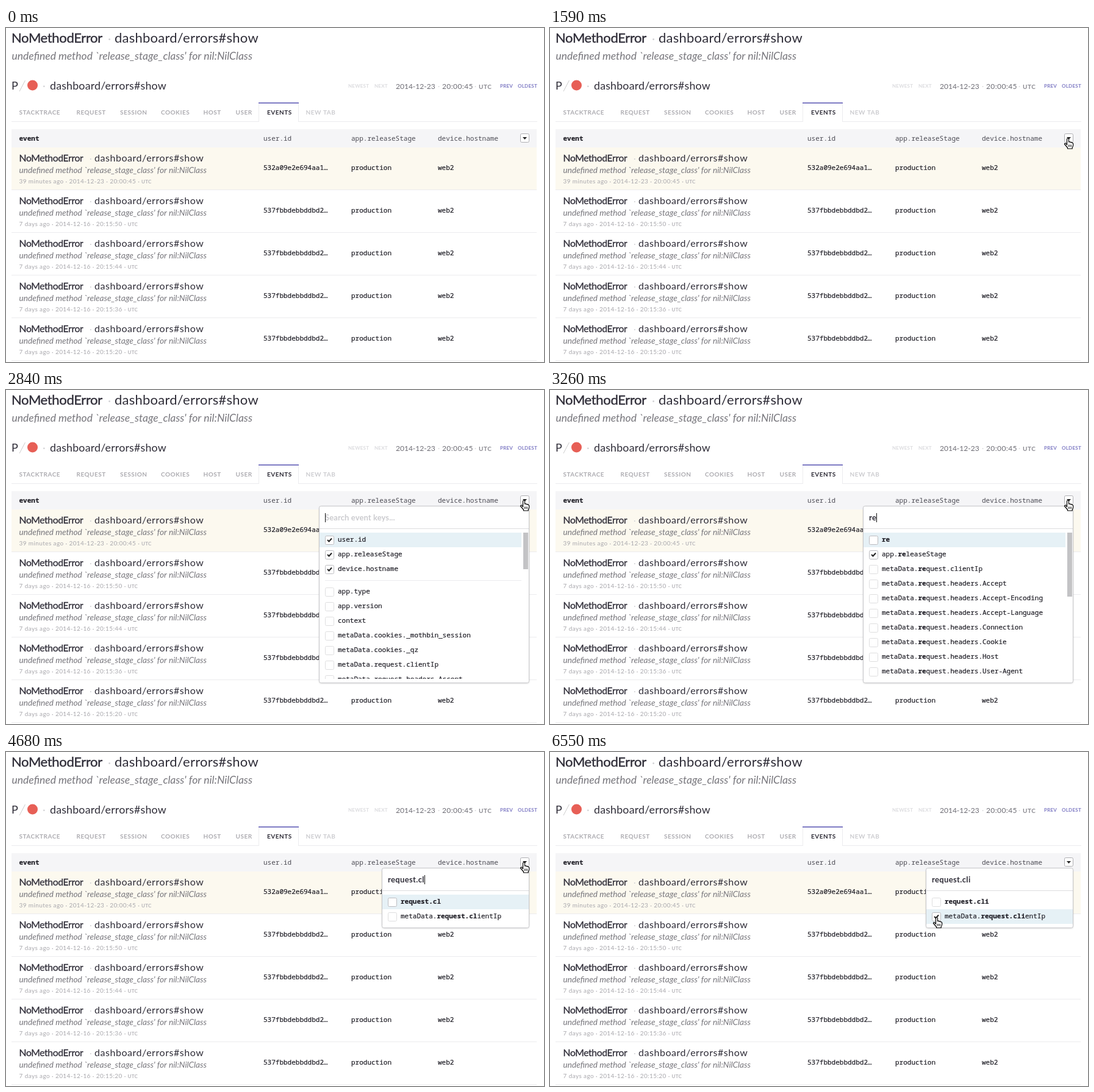
An HTML page with a canvas that plays this animation: 882x548 px, repeating every 8 s.

```html
<!DOCTYPE html>
<html lang="en">
<head>
<meta charset="utf-8">
<title>Event key picker</title>
<style>
html, body { margin: 0; width: 100%; height: 100%; overflow: hidden; background: #fff; }
canvas { display: block; }
</style>
</head>
<body>
<canvas id="stage" width="882" height="548"></canvas>
<script>
const ctx = document.getElementById('stage').getContext('2d');
const LOOP = 8000;
const INK = '#2f2d38', PURPLE = '#7f7bc4', RULE = '#ececee', DOT = '#d2d2d5';
const sans = (size, style = '') => `${style} ${size}px Lato, sans-serif`;
const mono = (style = '') => `${style} 11px "Noto Sans Mono", monospace`;

const KEYS = [
  'user.id', 'app.releaseStage', 'device.hostname', 'app.type', 'app.version', 'context',
  'metaData.cookies._mothbin_session', 'metaData.cookies._qz', 'metaData.request.clientIp',
  ...['Accept', 'Accept-Encoding', 'Accept-Language', 'Connection', 'Cookie', 'Host',
    'User-Agent', 'X-Forwarded-For'].map(name => 'metaData.request.headers.' + name)
];
const CHECKED = KEYS.slice(0, 3);
const CLIENT_IP = 'metaData.request.clientIp';

// Each timeline lists [start in ms, value]; a value holds until the next one.
const QUERY = [[1830, ''], [2900, 'r'], [3260, 're'], [3640, 'req'], [3820, 'requ'], [3910, 'reque'],
  [4000, 'reques'], [4170, 'request'], [4500, 'request.'], [4680, 'request.cl'], [4770, 'request.cli']];
const THUMB = [[0, 60], [2900, 97], [3260, 105], [3640, 114]];
const CARET = [[0, true], [2370, false], [2840, true], [5310, false], [5840, true], [6400, false]];
const POINTER = [[1080, [862, 181]], [1185, [853, 181]], [1290, [846, 181]], [1530, [847, 181]],
  [1590, [849, 180.5]], [5580, [845, 187]], [5670, [826, 206]], [5760, [780, 234]], [5820, [736, 251]],
  [5880, [704, 259.5]], [5960, [676, 266]], [6050, [655, 270]], [6140, [643, 272]], [6310, [634, 273]],
  [6400, [634, 271]]];

function at(timeline, t) {
  let value;
  for (const [start, v] of timeline) if (t >= start) value = v;
  return value;
}

function text(str, x, y, font, color = INK, spacing = 0, weight = 0) {
  ctx.font = font;
  ctx.letterSpacing = spacing + 'px';
  ctx.fillStyle = ctx.strokeStyle = color;
  ctx.fillText(str, x, y);
  if (weight) {
    ctx.lineWidth = weight;
    ctx.strokeText(str, x, y);
  }
  return x + ctx.measureText(str).width;
}

const code = (str, x, y, style) => text(str, x, y, mono(style), '#1f1e26', 0, .2);

function rect(x, y, w, h, color) {
  ctx.fillStyle = color;
  ctx.fillRect(x, y, w, h);
}

function box(x, y, w, h, radius, border) {
  ctx.beginPath();
  ctx.roundRect(x + .5, y + .5, w - 1, h - 1, radius);
  ctx.fillStyle = '#fff';
  ctx.fill();
  ctx.shadowColor = 'transparent';
  ctx.lineWidth = 1;
  ctx.strokeStyle = border;
  ctx.stroke();
}

function line(points, color, width) {
  ctx.beginPath();
  points.forEach(p => ctx.lineTo(...p));
  ctx.strokeStyle = color;
  ctx.lineWidth = width;
  ctx.stroke();
}

function drawHeader() {
  text('NoMethodError', 9, 24, sans(22), INK, -.35, .4);
  text('·', 167, 24, sans(20), DOT);
  text('dashboard/errors#show', 178, 24, sans(22), INK, .24);
  text("undefined method `release_stage_class' for nil:NilClass", 9.5, 52, sans(17.53, 'italic'), '#77767c');

  text('P', 9, 101, sans(18));
  line([[22, 104], [31.5, 86]], '#ccc', 1);
  ctx.beginPath();
  ctx.arc(43.5, 94, 8.5, 0, 2 * Math.PI);
  ctx.fillStyle = '#e75f56';
  ctx.fill();
  text('·', 60, 101, sans(18), DOT);
  text('dashboard/errors#show', 72, 101, sans(17.8), INK, .2);

  const link = sans(8, 'bold'), date = sans(12);
  text('NEWEST', 561, 98, link, '#dcdcdf', .2);
  text('NEXT', 604, 98, link, '#dcdcdf', .2);
  text('2014-12-23', 639, 100, date, '#6d6c74');
  text('·', 708, 100, date, DOT);
  text('20:00:45', 715, 100, date, '#6d6c74', .4);
  text('·', 768, 100, date, DOT);
  text('UTC', 775, 100, sans(10, 'bold'), '#8a8990', .5);
  text('PREV', 810, 98, link, PURPLE, .2);
  text('OLDEST', 839, 98, link, PURPLE, .25);
}

function drawTabs() {
  rect(9, 153, 862, 1, RULE);
  rect(414, 122, 66, 32, RULE);
  rect(415, 122, 64, 32, '#fff');
  rect(414, 122, 66, 2, PURPLE);
  const tabs = [['STACKTRACE', 21.5], ['REQUEST', 115.5], ['SESSION', 187], ['COOKIES', 254], ['HOST', 323.5],
    ['USER', 376.5], ['EVENTS', 428, INK], ['NEW TAB', 491.5, '#ccccd0']];
  for (const [label, x, color = '#adacb1'] of tabs) text(label, x, 142, sans(10, 'bold'), color, .5);
}

function drawRow(i, age, stamp, userId) {
  const y = 196 + 70 * i;
  if (i === 0) rect(9, y, 861, 69, '#fcf9ef');
  rect(9, y + 69, 861, 1, RULE);
  text('NoMethodError', 21.5, y + 23, sans(15.7), INK, -.35, .3);
  text('·', 137, y + 23, sans(14), DOT);
  text('dashboard/errors#show', 145, y + 23, sans(16), INK, .54);
  text("undefined method `release_stage_class' for nil:NilClass", 21.5, y + 42, sans(13.67, 'italic'), '#77767c');
  const end = text(`${age} ago · ${stamp} · `, 21.5, y + 59, sans(10), '#a9a8ad', .4);
  text('UTC', end, y + 59, sans(8, 'bold'), '#b4b3b8', .2);
  code(userId, 422, y + 37);
  code('production', 566, y + 37);
  code('web2', 708, y + 37);
}

function drawTable() {
  rect(9, 166, 861, 30, '#f5f5f7');
  code('event', 21.5, 185, 'bold');
  CHECKED.forEach((key, i) => text(key, [422, 566, 708][i], 185, mono(), '#4c4b54'));
  box(843, 173, 15, 15, 2, '#aeaeb2');
  ctx.beginPath();
  [[847, 179], [854, 179], [850.5, 183]].forEach(p => ctx.lineTo(...p));
  ctx.fillStyle = '#222';
  ctx.fill();

  drawRow(0, '39 minutes', '2014-12-23 · 20:00:45', '532a09e2e694aa1…');
  ['15:50', '15:44', '15:36', '15:20'].forEach((time, i) =>
    drawRow(i + 1, '7 days', '2014-12-16 · 20:' + time, '537fbbdebbddbd2…'));
}

function drawOption(key, query, left, y, right, active, checked) {
  if (active) rect(left + 1, y, right - left - 1, 24, '#e6f1f6');
  box(left + 10, y + 5, 15, 15, 2, active || checked ? '#bcbcc0' : '#dededf');
  if (checked) line([[left + 14, y + 12], [left + 16.5, y + 14.5], [left + 21, y + 9.5]], '#222', 2);
  const start = query ? key.indexOf(query) : 0, end = start + query.length;
  let x = code(key.slice(0, start), left + 31, y + 15);
  x = code(key.slice(start, end), x, y + 15, 'bold');
  code(key.slice(end), x, y + 15);
}

function drawPicker(t, query) {
  const options = query ? [query, ...KEYS.filter(key => key.includes(query))] : KEYS;
  const small = options.length < 3;
  const left = small ? 616 : 513, height = small ? 99 : 291;
  ctx.save();
  ctx.shadowColor = 'rgba(0,0,0,.16)';
  ctx.shadowBlur = 3;
  ctx.shadowOffsetY = 1;
  box(left, 190, 858 - left, height, 3, '#c6c6c9');
  ctx.restore();
  rect(left + 1, 227, 856 - left, 1, '#dcdcdf');

  const inputFont = sans(13, 'bold');
  const caretX = text(query, left + 10, 214, inputFont, INK, .35);
  if (!query) text('Search event keys...', left + 10, 214, inputFont, '#cbcbcf', .1);
  if (at(CARET, t)) rect(Math.round(caretX), 202, 1, 15, '#111');

  ctx.save();
  ctx.beginPath();
  ctx.rect(left, 229, 858 - left, small ? 58 : 245);
  ctx.clip();
  const active = t >= 5960 ? 1 : 0;
  options.forEach((key, i) => {
    const gap = !query && i >= CHECKED.length ? 13 : 0;
    const checked = CHECKED.includes(key) || key === CLIENT_IP && t >= 6550;
    drawOption(key, query, left, 234 + 24 * i + gap, small ? 857 : 845, i === active, checked);
  });
  if (!query) rect(left + 10, 312, 322, 1, RULE);
  if (!small) rect(848, 234, 8, at(THUMB, t), '#c3c3c5');
  ctx.restore();
}

function drawHand(x, y) {
  ctx.save();
  ctx.translate(x, y);
  ctx.lineJoin = 'round';
  const outline = new Path2D(`M-1.5 11V2Q-1.5.5 0 .5T1.5 2V6.5Q3.5 5.5 4.2 7.2Q6 6.2 6.8 8
    Q8.5 7.5 8.6 9.5V12Q8.4 14 7.2 15.5V17.5H-.5V16L-3 13L-5.5 10Q-5.5 8-3.5 8.8Z`);
  ctx.fillStyle = '#fff';
  ctx.fill(outline);
  ctx.strokeStyle = '#000';
  ctx.lineWidth = 1.2;
  ctx.stroke(outline);
  for (const dx of [1, 3.2, 5.4]) line([[dx, 11], [dx, 14.5]], '#000', .9);
  ctx.restore();
}

function draw() {
  const t = performance.now() % LOOP;
  rect(0, 0, 882, 548, '#fff');
  drawHeader();
  drawTabs();
  drawTable();
  const query = at(QUERY, t), pointer = at(POINTER, t);
  if (query !== undefined) drawPicker(t, query);
  if (pointer) drawHand(...pointer);
  requestAnimationFrame(draw);
}
draw();
</script>
</body>
</html>
```
